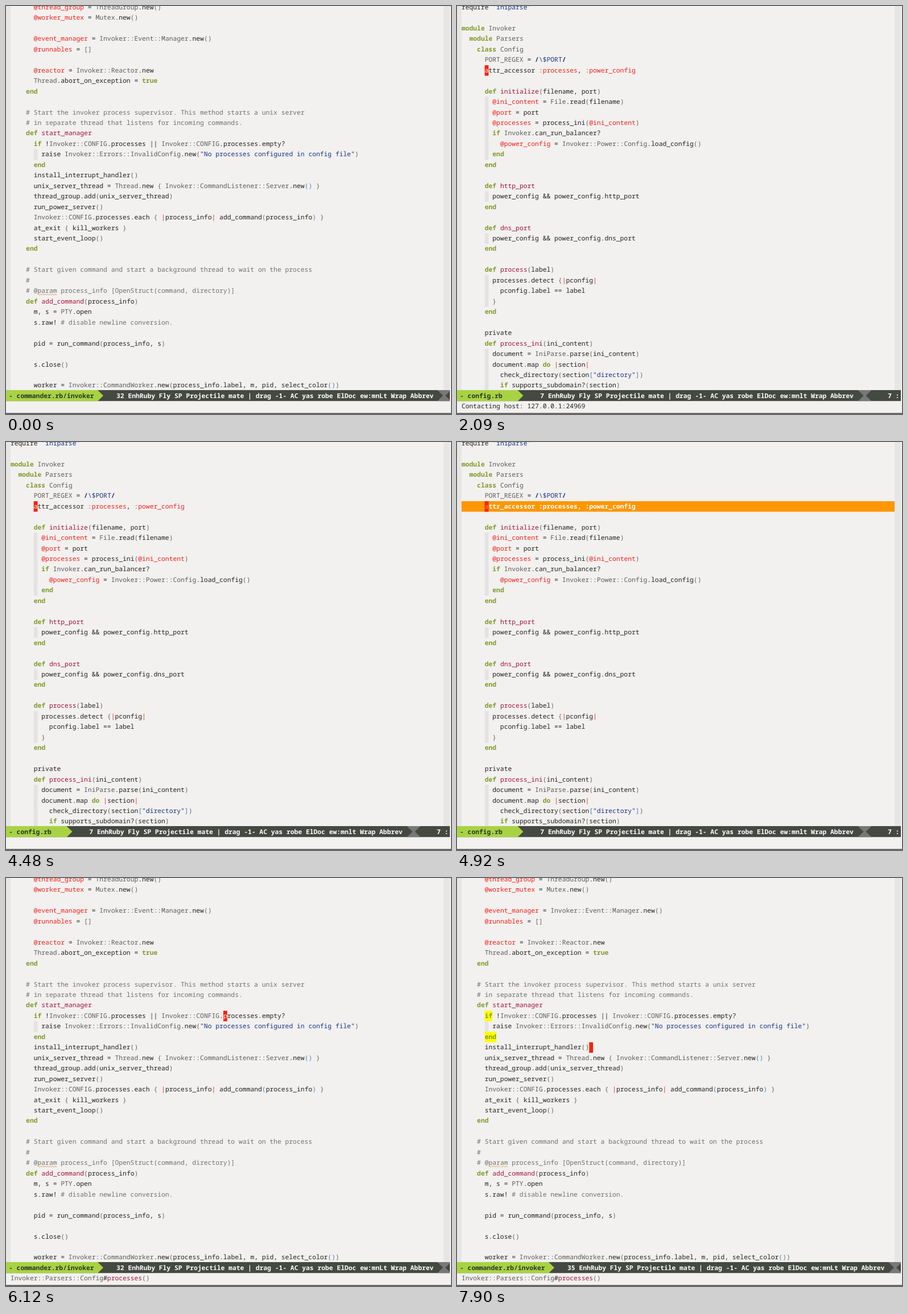
An HTML page for the animation above (8 s loop, 782 px wide and 717 px high).

```html
<!DOCTYPE html>
<html lang="en">
<head>
<meta charset="utf-8">
<title>Editor: jump to definition</title>
<style>
  html, body { margin: 0; width: 100%; height: 100%; overflow: hidden; background: #f2f1ef; }
  svg { display: block; width: 782px; height: 717px; }
  text { font: 11.333px "Noto Sans Mono", "DejaVu Sans Mono", monospace; white-space: pre;
         fill: #222; text-rendering: geometricPrecision; font-variant-ligatures: none; }
  .key { fill: #7f9a2b; font-weight: 700; }
  .fn { fill: #a6123f; }
  .var { fill: #f4201c; }
  .str { fill: #1d3488; }
  .slash { fill: #14246b; font-weight: 700; }
  .const { fill: #5c5c5c; }
  .note { fill: #707070; }
  .d1 { fill: #666; }
  .d2 { fill: #4a7fc4; }
  .mode { fill: #fff; font-weight: 700; }
  .file { fill: #2f3529; font-weight: 700; }
  .lit { fill: #fff; font-weight: 700; }
</style>
</head>
<body>
<svg viewBox="0 0 782 717" id="stage"></svg>
<script>
const NS = 'http://www.w3.org/2000/svg';
const LEFT = 7.9, CHAR = 6.8, TOP = -6.7, ROW = 18.46;
const PAPER = '#f2f1ef', MARGIN = '#e7e6e5', DARK = '#444941', GREY = '#787977';
const colX = col => LEFT + col * CHAR;
const rowY = row => TOP + row * ROW;

const commander = String.raw`      @thread_group = ThreadGroup.new()
      @worker_mutex = Mutex.new()

      @event_manager = Invoker::Event::Manager.new()
      @runnables = []

      @reactor = Invoker::Reactor.new
      Thread.abort_on_exception = true
    end

    # Start the invoker process supervisor. This method starts a unix server
    # in separate thread that listens for incoming commands.
    def start_manager
      if !Invoker::CONFIG.processes || Invoker::CONFIG.processes.empty?
        raise Invoker::Errors::InvalidConfig.new("No processes configured in config file")
      end
      install_interrupt_handler()
      unix_server_thread = Thread.new { Invoker::CommandListener::Server.new() }
      thread_group.add(unix_server_thread)
      run_power_server()
      Invoker::CONFIG.processes.each { |process_info| add_command(process_info) }
      at_exit { kill_workers }
      start_event_loop()
    end

    # Start given command and start a background thread to wait on the process
    #
    # @param process_info [OpenStruct(command, directory)]
    def add_command(process_info)
      m, s = PTY.open
      s.raw! # disable newline conversion.

      pid = run_command(process_info, s)

      s.close()

      worker = Invoker::CommandWorker.new(process_info.label, m, pid, select_color())`.split('\n');

const config = String.raw`require 'iniparse'

module Invoker
  module Parsers
    class Config
      PORT_REGEX = /\$PORT/
      attr_accessor :processes, :power_config

      def initialize(filename, port)
        @ini_content = File.read(filename)
        @port = port
        @processes = process_ini(@ini_content)
        if Invoker.can_run_balancer?
          @power_config = Invoker::Power::Config.load_config()
        end
      end

      def http_port
        power_config && power_config.http_port
      end

      def dns_port
        power_config && power_config.dns_port
      end

      def process(label)
        processes.detect {|pconfig|
          pconfig.label == label
        }
      end

      private
      def process_ini(ini_content)
        document = IniParse.parse(ini_content)
        document.map do |section|
          check_directory(section["directory"])
          if supports_subdomain?(section)`.split('\n');

function add(parent, tag, attrs = {}, content) {
  const el = document.createElementNS(NS, tag);
  for (const name in attrs) el.setAttribute(name, attrs[name]);
  if (content !== undefined) el.textContent = content;
  return parent.appendChild(el);
}
const rect = (parent, x, y, width, height, fill) => add(parent, 'rect', { x, y, width, height, fill });
const poly = (parent, points, fill) => add(parent, 'polygon', { points, fill });

const TOKENS = new RegExp([
  '(?<note>#.*)', '(?<str>"[^"]*"|\'[^\']*\')', '(?<regex>/\\S+/)',
  '(?<fn>(?<=def )\\w+)', '(?<key>\\b(?:module|class|def|end|if|do|true)\\b)',
  '(?<const>\\b[A-Z]\\w*|::)', '(?<var>@\\w+|:\\w+|(?<!\\|)\\|(?!\\|))',
  '(?<open>[({[])', '(?<close>[)}\\]])'].join('|'), 'g');

function codeLine(parent, line, y) {
  const text = add(parent, 'text', { x: LEFT, y });
  const span = (s, cls) => s && add(text, 'tspan', cls ? { class: cls } : {}, s);
  let last = 0, depth = 0;
  for (const m of line.matchAll(TOKENS)) {
    span(line.slice(last, m.index));
    last = m.index + m[0].length;
    const kind = Object.keys(m.groups).find(k => m.groups[k] !== undefined);
    if (kind === 'regex') {
      span('/', 'slash');
      span(m[0].slice(1, -1), 'str');
      span('/', 'slash');
    } else if (kind === 'open') span(m[0], 'd' + Math.min(++depth, 2));
    else if (kind === 'close') span(m[0], 'd' + Math.max(1, Math.min(depth--, 2)));
    else span(m[0], kind);
  }
  span(line.slice(last));
}

const stage = document.getElementById('stage');
const clip = add(add(stage, 'defs'), 'clipPath', { id: 'window' });
rect(clip, 0, 0, 780, 675);
const barClip = add(stage.firstChild, 'clipPath', { id: 'bar' });
rect(barClip, 0, 675, 780, 19.5);

rect(stage, 0, 0, 782, 717, PAPER);
rect(stage, 0, 0, 8, 675, MARGIN);
rect(stage, 769, 0, 11, 675, MARGIN);
rect(stage, 0, 715, 782, 2, '#6b6b6b');

// guides: [first row, last row] spans of the indent marker
function buildPane({ lines, guides, file, modes, greenEnd, greyStart }) {
  const root = add(stage, 'g');
  const body = add(root, 'g', { 'clip-path': 'url(#window)' });
  for (const [a, b] of guides) rect(body, colX(6), rowY(a), CHAR, (b - a + 1) * ROW, '#e4e3e1');
  const marks = add(body, 'g');
  lines.forEach((line, row) => codeLine(body, line, rowY(row) + 12.6));

  const bar = add(root, 'g', { 'clip-path': 'url(#bar)' });
  const top = 675, mid = 684.7, low = 694.5, g = greyStart;
  rect(bar, 0, top, 780, 19.5, DARK);
  poly(bar, `0,${top} ${greenEnd},${top} ${greenEnd + 10},${mid} ${greenEnd},${low} 0,${low}`, '#a7d343');
  poly(bar, `${g},${top} ${g + 24},${top} ${g + 14},${mid} ${g + 24},${low} ${g},${low} ${g + 10},${mid}`, GREY);
  add(bar, 'text', { x: 5, y: 689, class: 'file' }, '- ' + file);
  const status = add(bar, 'text', { x: greenEnd + 33, y: 689, class: 'mode' });
  const setLine = n => { status.textContent = String(n).padStart(2) + modes; };
  return { root, body, bar, marks, lines, setLine };
}

const panes = {
  commander: buildPane({
    lines: commander, guides: [[14, 14]], file: 'commander.rb/invoker', greenEnd: 161, greyStart: 758,
    modes: ' EnhRuby Fly SP Projectile mate | drag -1- AC yas robe ElDoc ew:mnLt Wrap Abbrev'
  }),
  config: buildPane({
    lines: config, guides: [[9, 14], [18, 18], [22, 22], [26, 28], [33, 36]],
    file: 'config.rb', greenEnd: 106.5, greyStart: 704.5,
    modes: ' EnhRuby Fly SP Projectile mate | drag -1- AC yas robe ElDoc ew:mnlt Wrap Abbrev'
  })
};
add(panes.config.bar, 'text', { x: 757, y: 689, class: 'mode' }, '7 :');

// spell-check squiggle under "param"
let wave = `M${colX(7)} 507`;
for (let i = 0; i < 8; i++) wave += 'q1.05 -2 2.1 0t2.1 0';
add(panes.commander.body, 'path', { d: wave, fill: 'none', stroke: '#e0a050', 'stroke-width': 1 });

// matching keywords
rect(panes.commander.marks, colX(6), rowY(13), 2 * CHAR, ROW, '#ffff00');
rect(panes.commander.marks, colX(6), rowY(15), 3 * CHAR, ROW, '#ffff00');

// flashed line after a jump
const flash = add(panes.config.body, 'g');
rect(flash, 8, rowY(6), 761, ROW, '#ff9604');
add(flash, 'text', { x: LEFT, y: rowY(6) + 12.6, class: 'lit' }, config[6]);

const cursor = add(stage, 'g');
const block = rect(cursor, 0, 0, CHAR, ROW, '#fa2008');
const glyph = add(cursor, 'text');

const echoes = { info: add(stage, 'g'), host: add(stage, 'g') };
const info = add(echoes.info, 'text', { x: LEFT, y: 707 });
[['Invoker::Parsers::Config', 'const'], ['#', ''], ['processes', 'fn'], ['()', 'd1']]
  .forEach(([s, cls]) => add(info, 'tspan', { class: cls }, s));
add(echoes.host, 'text', { x: LEFT, y: 707 }, 'Contacting host: 127.0.0.1:24969');

const call = [13, 55], attr = [6, 6];
// [start ms, pane, line number, cursor [row, col], echo message, effect]
const timeline = [
  [0, 'commander', 32, null],
  [150, 'commander', 32, call],
  [600, 'commander', 32, null],
  [900, 'commander', 31, [12, 21]],
  [1200, 'commander', 32, call],
  [1800, 'commander', 32, null, 'info'],
  [2090, 'config', 7, attr, 'host'],
  [2690, 'config', 7, null, 'host'],
  [3140, 'config', 7, attr, 'host'],
  [3580, 'config', 7, null, 'host'],
  [4180, 'config', 7, attr, 'host'],
  [4480, 'config', 7, attr],
  [4620, 'config', 7, attr, 'info', 'flash'],
  [4920, 'config', 7, attr, '', 'flash'],
  [5220, 'config', 7, attr, 'info'],
  [5670, 'config', 7, null, 'info'],
  [6120, 'commander', 32, call, 'info'],
  [6720, 'commander', 32, null, 'info'],
  [7170, 'commander', 32, call, 'info'],
  [7610, 'commander', 33, [14, 55], 'info'],
  [7760, 'commander', 34, [15, 9], 'info'],
  [7900, 'commander', 35, [16, 33], 'info', 'match']
];

const show = (el, on) => { el.style.display = on ? '' : 'none'; };
let current;

function render(time) {
  const state = timeline.findLast(s => s[0] <= time % 8000);
  if (state === current) return;
  current = state;
  const [, name, line, at, echo, effect] = state;
  for (const key in panes) show(panes[key].root, key === name);
  for (const key in echoes) show(echoes[key], key === echo);
  panes[name].setLine(line);
  show(panes.commander.marks, effect === 'match');
  show(flash, effect === 'flash');
  show(cursor, at);
  if (!at) return;
  const [row, col] = at;
  block.setAttribute('x', colX(col));
  block.setAttribute('y', rowY(row));
  glyph.setAttribute('x', colX(col));
  glyph.setAttribute('y', rowY(row) + 12.6);
  glyph.style.fill = effect === 'flash' ? '#ff9604' : PAPER;
  glyph.textContent = panes[name].lines[row][col] || '';
}

const began = performance.now();
function tick() {
  render(performance.now() - began);
  requestAnimationFrame(tick);
}
tick();
</script>
</body>
</html>
```
